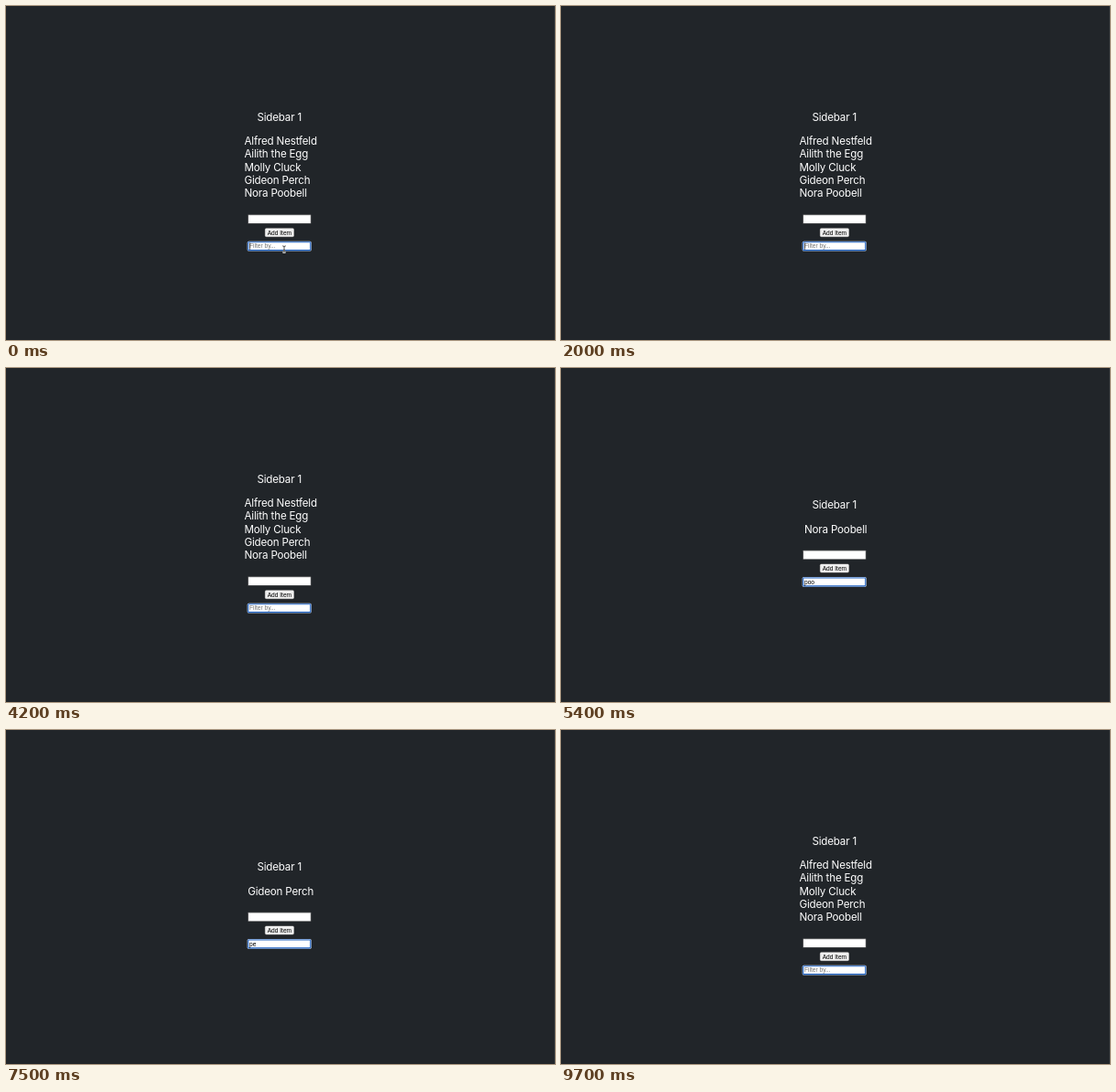
Animation of 600x366 px, one loop 9800 ms. Source, as an HTML page with a canvas:

```html
<!DOCTYPE html>
<html lang="en">
<head>
<meta charset="utf-8">
<title>Filterable list</title>
<style>
  html, body { margin: 0; width: 100%; height: 100%; overflow: hidden; background: #212529; }
  canvas { display: block; }
</style>
</head>
<body>
<canvas id="stage" width="600" height="366"></canvas>
<script>
const ctx = document.getElementById('stage').getContext('2d');
const LOOP = 9800;
const LINE = 14.4;
const LIST_FONT = '11.6px Inter, sans-serif';
const FORM_FONT = '6.6px "Liberation Sans", Arial, sans-serif';
const ITEMS = ['Alfred Nestfeld', 'Ailith the Egg', 'Molly Cluck', 'Gideon Perch', 'Nora Poobell'];

// Each burst types or erases one letter per listed time.
const edits = [[0, '']];
function type(word, times) {
  times.forEach((t, i) => edits.push([t, word.slice(0, i + 1)]));
}
function erase(word, times) {
  times.forEach((t, i) => edits.push([t, word.slice(0, word.length - 1 - i)]));
}
type('alfred', [300, 400, 600, 700, 800, 900]);
erase('alfred', [1500, 1600, 1700, 1800, 1900, 2000]);
type('ailith', [2200, 2300, 2500, 2500, 2700, 2800]);
erase('ailith', [3200, 3300, 3400, 3600, 3700, 3800]);
type('poo', [4600, 4800, 4900]);
erase('poo', [5800, 5900, 6000]);
type('pe', [6900, 7000]);
erase('pe', [7700, 7900]);
type('p', [8800]);
erase('p', [9700]);

const CARET_HIDDEN = [[1300, 1500], [4200, 4600], [5400, 5800], [6400, 6900],
  [7500, 7700], [7900, 8000], [8500, 8800], [9300, 9800]];
const POINTER_GONE = 300;

function box(x, y, w, h, r, color) {
  ctx.fillStyle = color;
  ctx.beginPath();
  ctx.roundRect(x, y, w, h, r);
  ctx.fill();
}

function setFont(font) {
  ctx.font = font;
  ctx.letterSpacing = font === LIST_FONT ? '-0.18px' : '0px';
}

function label(str, x, y, font, color, align = 'left') {
  setFont(font);
  ctx.textAlign = align;
  ctx.fillStyle = color;
  ctx.fillText(str, x, y);
  return ctx.measureText(str).width;
}

function drawList(items) {
  setFont(LIST_FONT);
  const widest = Math.max(...items.map(s => ctx.measureText(s).width));
  items.forEach((s, i) => label(s, 300.2 - widest / 2, 151.8 + i * LINE, LIST_FONT, '#fff'));
}

function drawForm(text, caretOn) {
  box(264.4, 228.6, 69, 10, 0.5, '#767676');
  box(265, 229.2, 67.8, 8.8, 0, '#fff');

  box(282.8, 243.3, 32.2, 10, 1.8, '#767676');
  box(283.3, 243.8, 31.2, 9, 1.4, '#efefef');
  label('Add Item', 298.9, 250.6, FORM_FONT, '#000', 'center');

  box(263.7, 257.8, 70, 10.8, 1.6, '#dfe7f2');
  box(264.1, 258.2, 69.2, 10, 1.3, '#1c5fc0');
  box(265.2, 259.3, 67, 7.8, 0, '#fff');
  const width = text ? label(text, 266, 265.4, FORM_FONT, '#000') : 0;
  if (!text) label('Filter by...', 266, 265.4, FORM_FONT, '#757575');
  if (caretOn) box(266 + width, 259.4, 0.6, 7.6, 0, '#000');
}

function drawPointer() {
  const beam = new Path2D('M302.2 262.9Q304 262.9 304 264.1V269Q304 270.2 302.2 270.2' +
    'M305.8 262.9Q304 262.9 304 264.1M304 269Q304 270.2 305.8 270.2M302.9 267.5H305.1');
  for (const [width, color] of [[1.6, '#fff'], [0.8, '#222']]) {
    ctx.lineWidth = width;
    ctx.strokeStyle = color;
    ctx.stroke(beam);
  }
}

function draw(t) {
  const text = edits.findLast(e => e[0] <= t)[1];
  const shown = ITEMS.filter(s => s.toLowerCase().includes(text));
  const removed = ITEMS.length - shown.length;
  const caretOn = !CARET_HIDDEN.some(([from, to]) => t >= from && t < to);

  box(0, 0, 600, 366, 0, '#212529');
  box(599, 0, 1, 366, 0, '#33373a');

  // The column stays vertically centred as rows disappear.
  ctx.save();
  ctx.translate(0, removed * LINE / 2);
  label('Sidebar 1', 298.7, 125.5, LIST_FONT, '#fff', 'center');
  drawList(shown);
  ctx.translate(0, -removed * LINE);
  drawForm(text, caretOn);
  ctx.restore();

  if (t < POINTER_GONE) drawPointer();
}

const start = performance.now();
function tick() {
  draw((performance.now() - start) % LOOP);
  requestAnimationFrame(tick);
}
tick();
</script>
</body>
</html>
```
